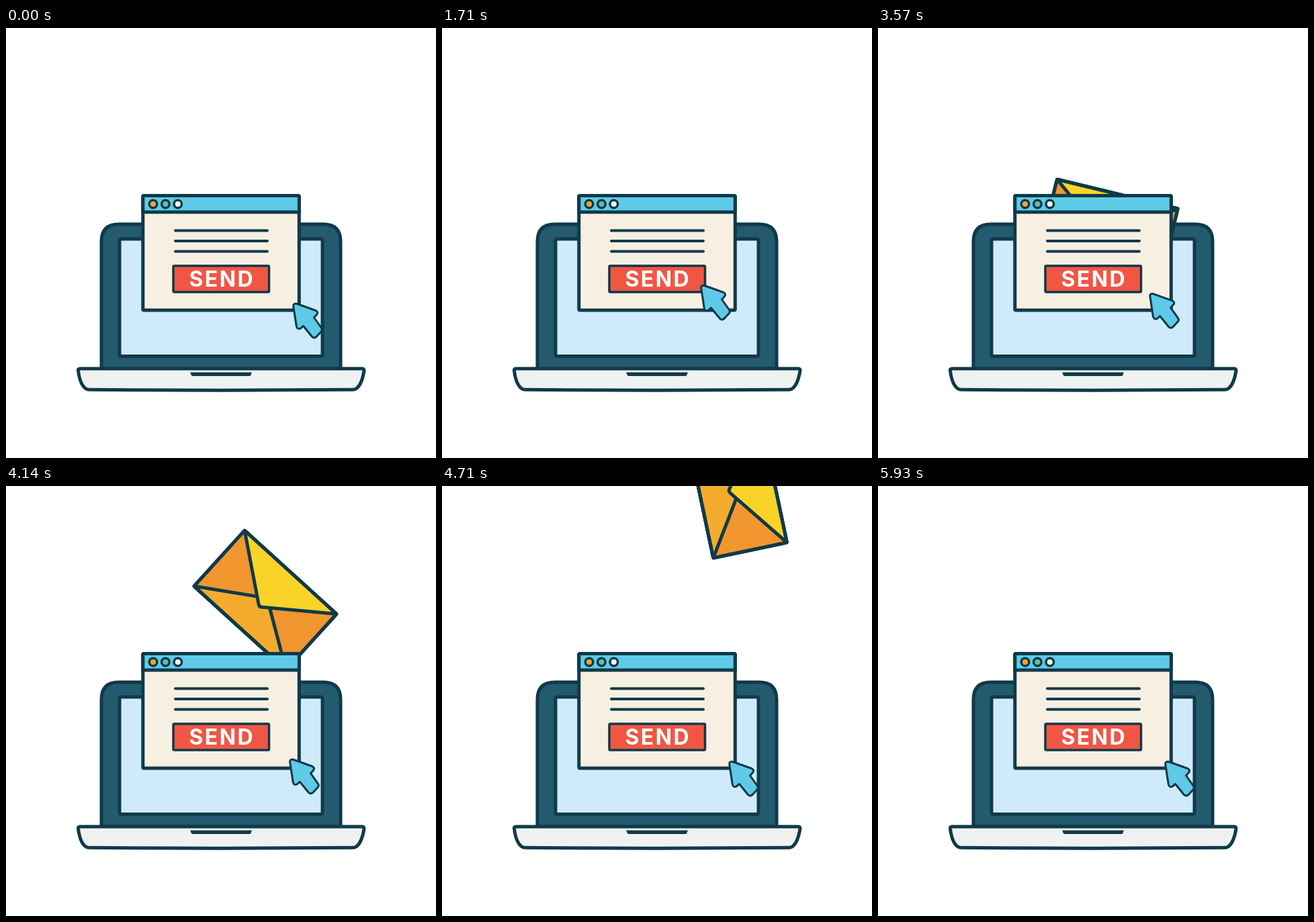
Animation, 640 px wide and 640 px high, one loop 7210 ms. Source, as an HTML page:

```html
<!DOCTYPE html>
<html lang="en">
<head>
<meta charset="utf-8">
<title>Send mail</title>
<style>
  html, body { margin: 0; width: 100%; height: 100%; overflow: hidden; background: #fff; }
  svg { display: block; width: 100vw; height: 100vh; }
  .ink { stroke: #0f3a49; stroke-width: 5; stroke-linejoin: round; stroke-linecap: round; }
  .send { font: 700 32px Inter, "Open Sans", sans-serif; letter-spacing: 2.4px; fill: #fff; }
</style>
</head>
<body>
<svg viewBox="0 0 640 640">
  <g id="laptop" class="ink">
    <path fill="#245a6e" d="M142 507V318Q142 292 168 292H472Q498 292 498 318V507Z"/>
    <rect x="169" y="314" width="302" height="174.5" rx="2" fill="#cfebfb"/>
    <path fill="#eff2f1" d="M110 507H530Q533 507 533 510C531 522 527 533 521 537Q519 538.5 515 538.3Q320 540 125 538.3Q121 538.5 119 537C113 533 109 522 107.500 510Q107 507 110 507Z"/>
    <path fill="#0f3a49" stroke="none" d="M274 512.500H366L364.500 516.500Q364 518 362 518H279Q276.500 518 276 517Z"/>
  </g>

  <g id="envelope" class="ink">
    <g transform="translate(-92.500 -56)">
      <rect width="185" height="112" rx="2" fill="#f2962f"/>
      <path fill="#f5ab2d" d="M0 112L92.500 52L185 112Z"/>
      <path fill="#fad329" d="M0 0L89 67Q92.500 70 96 67L185 0Z"/>
      <rect width="185" height="112" rx="2" fill="none"/>
    </g>
  </g>

  <g id="window" class="ink" stroke-width="4.500">
    <rect x="203.800" y="249.500" width="232.500" height="170.500" rx="1.500" fill="#f8efe3"/>
    <path fill="#5fcae7" d="M203.800 274V250.500L205 249.500H435L436.300 250.500V274Z"/>
    <g style="stroke-width:3.500px">
      <circle cx="219" cy="262" r="5.800" fill="#f9a230"/>
      <circle cx="237.400" cy="262" r="5.800" fill="#6fb8a0"/>
      <circle cx="255.800" cy="262" r="5.800" fill="#fbf5e9"/>
      <path style="stroke-width:4px" d="M252 301.500H389M252 317H389M252 332.500H389"/>
      <rect x="249" y="354" width="142.500" height="39" rx="1.500" fill="#f15645"/>
    </g>
    <text class="send" x="321.200" y="385" text-anchor="middle" stroke="none">SEND</text>
  </g>

  <circle id="ripple" class="ink" cx="384.500" cy="384.500" fill="none" style="stroke-width:2px"/>
  <path id="cursor" class="ink" style="stroke-width:3px" fill="#5fcae7"
    d="M427.700 414Q427.500 409.300 433 410.500L461 420.500Q465.500 423 462.500 426.500L458.500 431L469.500 446.500Q471.500 449.500 469 452L462 459.500Q458.500 462.500 455.500 459.500L442.500 443.500L438.500 447Q433.500 449.500 432.300 444Z"/>
</svg>
<script>
  const LOOP = 7210, FPS = 14;
  const part = id => document.getElementById(id);
  const envelope = part('envelope'), ripple = part('ripple'), cursor = part('cursor');

  const progress = (frame, start, length) => Math.min(1, Math.max(0, (frame - start) / length));
  const sine = u => (1 - Math.cos(Math.PI * u)) / 2;

  // cubic-bezier(a, 0, b, 1), solved by bisection
  function bezier(u, a, b) {
    let low = 0, high = 1;
    for (let i = 0; i < 24; i++) {
      const s = (low + high) / 2, r = 1 - s;
      if (3 * r * r * s * a + 3 * r * s * s * b + s ** 3 < u) low = s; else high = s;
    }
    return low * low * (3 - 2 * low);
  }

  function draw(time) {
    const frame = Math.floor((time % LOOP + 5) * FPS / 1000);

    const reach = sine(progress(frame, 0.4, 23.8)) - sine(progress(frame, 37.5, 26.5));
    cursor.setAttribute('transform', `translate(${-42 * reach} ${-27 * reach})`);

    const click = progress(frame, 27, 12);
    ripple.setAttribute('r', 10.5 * sine(click));
    ripple.setAttribute('opacity', click > 0 ? 1 - click : 0);

    const flight = bezier(progress(frame, 33, 50.6), 0.6625, 0.382);
    envelope.setAttribute('transform',
      `translate(${322.8 + 144.2 * flight} ${364 - 443.4 * flight}) rotate(${96.5 * flight})`);
    envelope.setAttribute('opacity', frame < 34 ? 0 : 1 - progress(frame, 71, 12));
  }

  const start = performance.now();
  function tick() {
    draw(performance.now() - start);
    requestAnimationFrame(tick);
  }
  tick();
</script>
</body>
</html>
```
